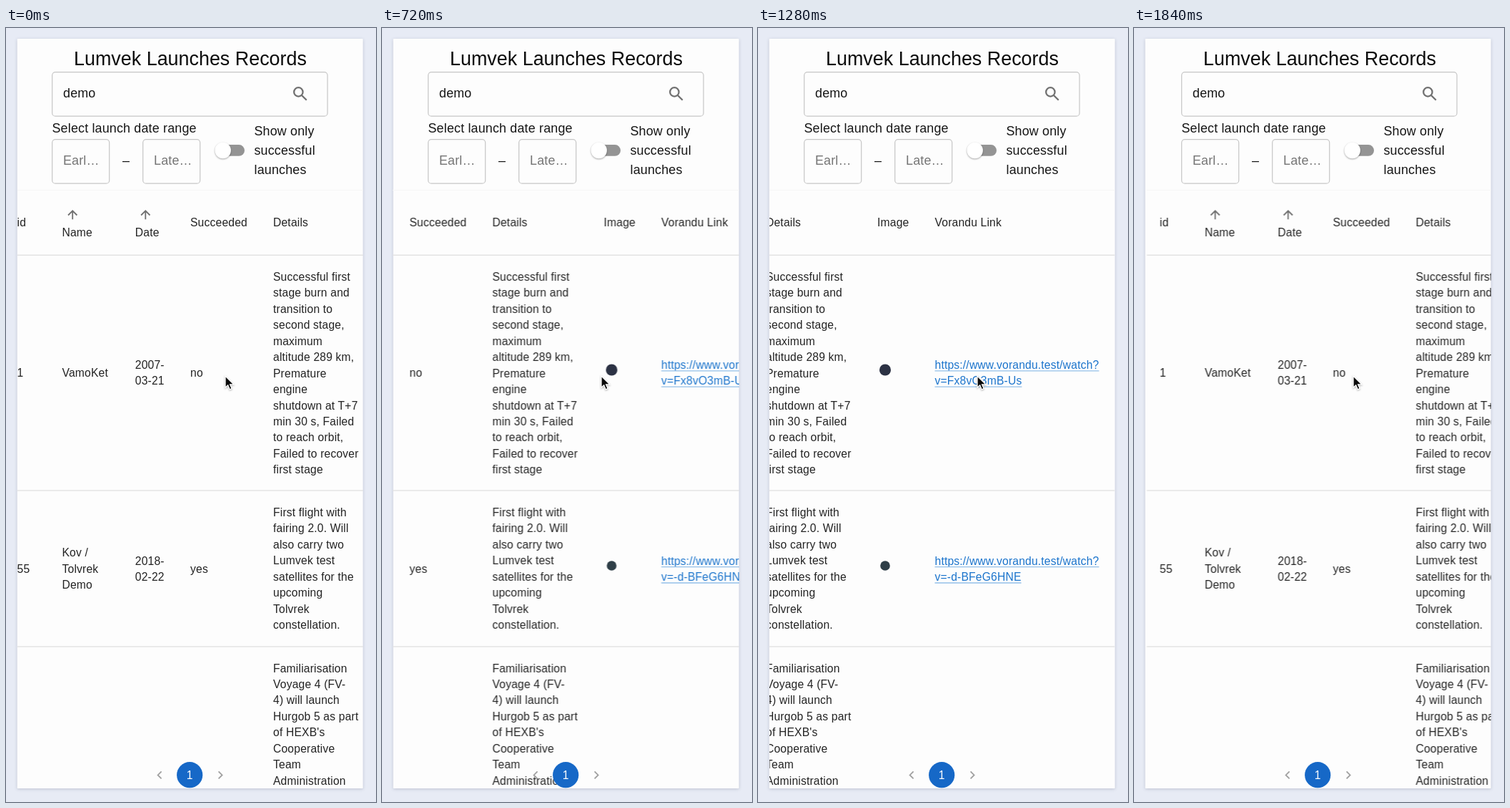
These frames come from a looping animation (518 px wide and 1081 px high, 1920 ms). An HTML page:

```html
<!DOCTYPE html>
<html lang="en">
<head>
<meta charset="utf-8">
<title>Launch records</title>
<style>
  html, body { margin: 0; width: 100%; height: 100%; overflow: hidden; background: #e7ebf5; }
  svg { display: block; width: 100vw; height: 100vh; }
  text { font: 15.68px "Liberation Sans", Arial, sans-serif; letter-spacing: .168px; fill: #232323; }
  .big { font-size: 17.92px; fill: #161616; }
  .hint { fill: #757575; }
  .title { font-size: 26.9px; letter-spacing: 0; fill: #0c0c0c; text-anchor: middle; }
  .link { fill: #1b74cc; }
  .underline { stroke: #93bfe8; stroke-width: 1.3; }
  .page { fill: #fff; text-anchor: middle; letter-spacing: 0; }
  .card { fill: #fdfdfd; filter: drop-shadow(0 1px 2px rgba(40, 50, 80, .22)); }
  .field { fill: none; stroke: #c6c6c6; stroke-width: 1.2; }
  .rule { stroke: #e3e3e3; stroke-width: 1.5; }
  .icon { fill: none; stroke: #707070; stroke-width: 1.8; }
  .thumb { fill: #fff; filter: drop-shadow(0 1px 1.2px rgba(0, 0, 0, .35)); }
  .cursor { fill: #0a0a0a; stroke: #fff; stroke-width: 1.3; filter: drop-shadow(0 1px 1px rgba(0, 0, 0, .3)); }
</style>
</head>
<body>
<svg viewBox="0 0 518 1081" preserveAspectRatio="none">
  <clipPath id="view"><rect x="15.7" y="15" width="483.6" height="1047"/></clipPath>
  <rect class="card" x="15.7" y="15" width="484" height="1047" rx="1"/>
  <g clip-path="url(#view)">
    <g id="sheet">
      <g id="form">
        <rect class="field" x="64.7" y="61.6" width="385.4" height="61.6" rx="4.5"/>
        <rect class="field" x="64.7" y="155.6" width="80" height="61.6" rx="4.5"/>
        <rect class="field" x="191.7" y="155.6" width="80" height="61.6" rx="4.5"/>
        <g class="icon" style="stroke-width:2.3">
          <circle cx="409.4" cy="89.4" r="6.2"/>
          <path d="M414 94l6.8 6.8"/>
        </g>
        <rect x="296" y="163.1" width="38" height="15.7" rx="7.85" fill="#949494"/>
        <circle class="thumb" cx="303.7" cy="171" r="11.2"/>
      </g>
      <g id="table"></g>
    </g>
  </g>
  <g>
    <path d="M217.6 1038.4l-5 5 5 5M297.6 1038.4l5 5-5 5" fill="none" stroke="#a0a0a0" stroke-width="1.8"/>
    <circle cx="257.2" cy="1043.2" r="18.1" fill="#1668c7"/>
    <text class="page" x="257" y="1049">1</text>
  </g>
  <path class="cursor" d="M307 486v16.2l3.7-3.4 2.5 6 2.9-1.2-2.5-5.8h5.2z"/>
</svg>
<script>
const LOOP = 1920, PITCH = 22.44;
const byId = id => document.getElementById(id);
const form = byId('form'), table = byId('table');

function add(parent, tag, attrs, text = '') {
  const el = document.createElementNS('http://www.w3.org/2000/svg', tag);
  for (const key in attrs) el.setAttribute(key, attrs[key]);
  el.textContent = text;
  return parent.appendChild(el);
}

// Lines are separated by "|".
function write(parent, x, y, text, cls = '', pitch = PITCH) {
  return text.split('|').map((line, i) =>
    add(parent, 'text', { x, y: y + i * pitch, class: cls }, line));
}

function writeLink(parent, x, y, text) {
  write(parent, x, y, text, 'link').forEach((el, i) => add(parent, 'path', {
    d: `M${x} ${y + i * PITCH + 3}h${el.getComputedTextLength()}`, class: 'underline'
  }));
}

write(form, 258, 51.5, 'Lumvek Launches Records', 'title');
write(form, 80, 97.4, 'demo', 'big');
write(form, 64.5, 145.6, 'Select launch date range', 'big');
write(form, 80, 191.3, 'Earl…', 'big hint');
write(form, 163, 191.3, '–', 'big');
write(form, 207, 191.3, 'Late…', 'big hint');
write(form, 347.5, 150, 'Show only|successful|launches', 'big', 26.9);

const col = { id: 34, name: 97, date: 199.3, ok: 276.5, details: 392.5, image: 548.5, link: 629 };

add(table, 'path', { d: 'M16 226.5H881', stroke: '#f6f6f6' });
for (const y of [317.3, 646, 864]) add(table, 'path', { d: `M16 ${y}H881`, class: 'rule' });

write(table, col.id, 277.4, 'id');
write(table, col.name, 291.4, 'Name');
write(table, col.date, 291.4, 'Date');
write(table, col.ok, 277.4, 'Succeeded');
write(table, col.details, 277.4, 'Details');
write(table, col.image, 277.4, 'Image');
write(table, col.link, 277.4, 'Vorandu Link');
for (const x of [111.7, 213.8])
  add(table, 'path', { d: `M${x} 267.3V255.5m-6.2 6l6.2 -6.2 6.2 6.2`, class: 'icon' });

const rows = [
  {
    mid: 487, top: 353, id: '1', name: 'VamoKet', date: '2007-|03-21', ok: 'no',
    details: 'Successful first|stage burn and|transition to|second stage,|maximum|altitude 289 km,|Premature|engine|shutdown at T+7|min 30 s, Failed|to reach orbit,|Failed to recover|first stage',
    badge: { cy: 477.5, r: 8, fill: '#2c3244' },
    link: 'https://www.vorandu.test/watch?|v=Fx8vO3mB-Us'
  },
  {
    mid: 760.8, top: 682, id: '55', name: 'Kov /|Tolvrek|Demo', date: '2018-|02-22', ok: 'yes',
    details: 'First flight with|fairing 2.0. Will|also carry two|Lumvek test|satellites for the|upcoming|Tolvrek|constellation.',
    badge: { cy: 751, r: 6.8, fill: '#2f3f48' },
    link: 'https://www.vorandu.test/watch?|v=-d-BFeG6HNE'
  },
  {
    top: 899.5,
    details: 'Familiarisation|Voyage 4 (FV-|4) will launch|Hurgob 5 as part|of HEXB\'s|Cooperative|Team|Administration'
  }
];

for (const row of rows) {
  write(table, col.details, row.top, row.details);
  if (!row.mid) continue;
  for (const key of ['id', 'name', 'date', 'ok', 'link']) {
    const extra = row[key].split('|').length - 1;
    const put = key === 'link' ? writeLink : write;
    put(table, col[key], row.mid - extra * PITCH / 2, row[key]);
  }
  add(table, 'circle', { cx: 559.5, ...row.badge });
}

// Each step is [start in ms, horizontal offset], held until the next.
function play(el, steps) {
  const frames = [...steps, [LOOP, steps.at(-1)[1]]].map(([t, x]) =>
    ({ offset: t / LOOP, transform: `translateX(${x}px)`, easing: 'step-end' }));
  el.animate(frames, { duration: LOOP, iterations: Infinity });
}

play(table, [
  [0, -18.5], [80, -46], [160, -71], [240, -82], [320, -87], [400, -90], [480, -91],
  [560, -91.3], [640, -132], [720, -238], [800, -336], [880, -381.5],
  [1360, -350], [1440, -291], [1520, -162], [1600, -48], [1680, 0]
]);
play(byId('sheet'), [
  [0, 0], [960, -3], [1040, -2], [1120, -1], [1200, 0], [1680, 5], [1840, 2]
]);
</script>
</body>
</html>
```
